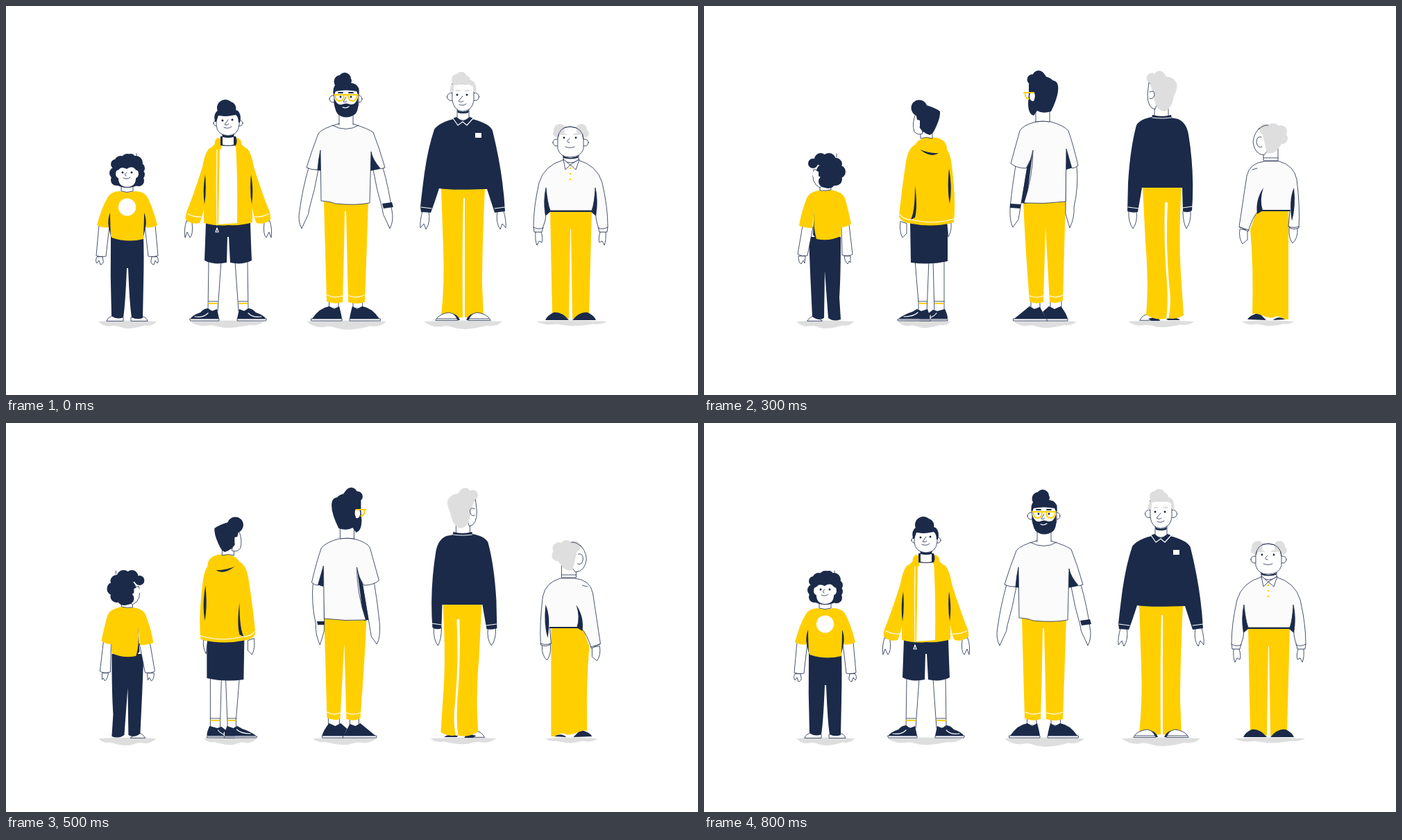
An HTML page that plays this animation: 997x561 px, repeating every 3.1 s.

```html
<!DOCTYPE html>
<html lang="en">
<head>
<meta charset="utf-8">
<title>Five ages turning around</title>
<style>
html, body { margin: 0; width: 100%; height: 100%; overflow: hidden; background: #fff; }
svg { display: block; width: 100%; height: 100%; }
path { fill: none; stroke-linejoin: round; stroke-linecap: round; }
.n { fill: #1b2a49; }
.y { fill: #ffcf01; }
.g { fill: #dedede; }
.w { fill: #fff; }
.o { fill: #fff; stroke: #1b2a49; stroke-width: .8; }
.p { fill: #fbfbfb; stroke: #1b2a49; stroke-width: .8; }
.l { stroke: #1b2a49; stroke-width: .8; }
.k { stroke: #1b2a49; stroke-width: 1.8; }
.s { stroke: #fff; stroke-width: 1.2; }
.t { stroke: #ffcf01; stroke-width: 1.9; }
</style>
</head>
<body>
<svg id="stage" viewBox="0 0 997 561"></svg>
<script>
// Each line: optional 2 (also draw its mirror image), style letter, path; "@x y r" is a circle.
// Marks sit on one side of the body only, so they are never mirrored.
const boy = {
  axis: 174.5,
  shade: { front: [133, 217, 11], turn: [133, 216, 11], side: [145, 206, 10] },
  base: `
2o M145 454Q147 447 157 447L169 449V454Z
n M151 332H198Q199 360 198 400L197 450Q188 453 181 449Q178 430 176 378H174Q172 430 169 449Q160 453 152 447Q150 390 151 332Z
2o M134 316L130 360Q137 363 144 361L149 317Z
2o M131 362Q128 367 131 371L134 367L136 373Q141 372 140 367L139 362Z
y M163 267Q175 270 186 267Q200 267 205 278Q213 295 218 316Q210 321 201 319Q198 328 198 336Q175 342 152 334Q150 322 148 319Q139 321 131 316Q138 290 146 277Q150 268 163 267Z
2n M199 298Q203 308 201 319L198 333Q199 310 199 298Z`,
  front: `
w @174.5 290 12.6`,
  head: `
o M166 256V267Q174 270 183 267V256Z
n @158 228 7@158 241 9@159 251 8@165 225 9@175 223 10@187 226 10@192 234 8@192 243 8@191 252 8@180 219 6
n M157 228H193V257Q174 267 157 257Z
w M161 239Q164 230 174 235Q183 229 188 238L187 250Q186 261 174.5 261Q163 261 162 250Z
2w M164 237Q158 235 158 243Q159 249 164 248Z
l M188 219V213`,
  face: `
n @168 240 1.5@181 240 1.5
l M174 240Q169 244 173 245
l M169 248Q174 251 179 247`,
  nape: `
o M166 256V267Q174 270 183 267V256Z
n @158 228 8@157 240 9@160 252 9@166 223 10@179 222 10@190 229 9@193 241 9@189 252 9@175 251 12@175 237 16`,
  side: `
o M162 455Q165 449 175 449L188 451V455Z
n M154 336L192 333Q189 380 189 420L190 453Q180 456 168 449Q166 420 161 385Q157 360 154 336Z
y M164 265Q152 272 149 293L150 337Q162 341 193 335L195 318Q194 282 188 270Q184 264 178 262Z
w M150 280Q161 279 162 291Q160 303 149 301Z
n M172 300Q170 312 173 319L195 319L192 336L170 339Q169 328 172 320Q170 310 172 300Z
o M172 320L166 358Q170 363 179 361L192 320Q182 323 172 320Z
o M167 361Q167 368 170 373L173 370L175 372L176 361Z
o M167 254L166 264Q174 266 184 262V248Z
n M167 258L177 256Q172 262 167 261Z
o M154 233L148 242L154 246Q155 258 165 259Q178 258 184 248L182 233Z
n @154 224 7.5@164 221 8@176 222 10@187 224 9@193 232 8@194 240 7.5@189 248 8
n M150 230Q160 236 168 233L172 242Q176 236 182 250L195 246V226L160 219Z
w M181 238Q173 235 173 243Q175 249 181 248Z
n @159 239 1.4
l M157 247Q160 249 163 246M190 219Q193 215 191 212`,
  turn: `
o M149 454Q153 447 160 447L170 454Z
n M151 333H197Q197 390 195 420L197 452Q187 456 179 450L174 382L173 450Q165 455 156 448Q153 390 151 333Z
o M142 317L135 358Q141 362 149 360L157 319Z
o M136 361Q136 370 140 372L143 367L145 371L146 361Z
o M198 319L199 359Q208 362 214 358L209 315Z
o M202 361Q203 369 207 372L209 368L211 370V361Z
n M159 294L157 330L166 339L170 320Z
y M166 266Q150 268 147 280Q140 298 137 317Q146 321 156 320Q157 308 159 294Q157 320 162 336Q180 340 197 332L198 319Q206 319 212 314Q207 290 203 277Q199 268 183 265Q174 268 166 266Z`,
  turnHead: `
o M167 255V266Q175 267 183 265V255Z
o M158 236Q153 255 167 262L176 255L170 238Z
n @157 227 7@168 221 9@180 222 10@190 228 9@194 239 10@190 250 9@179 252 11@174 253 9@172 238 10@180 237 14
w M165 239Q157 235 156 243Q159 251 165 248Z
l M191 218V213`
};

const teen = {
  axis: 320,
  shade: { front: [265, 372, 10], turn: [279, 355, 10], side: [287, 354, 10] },
  base: `
2o M292 368L291 440H305L310 368Z
2t M292 429H304
2l M292 426H305
2n M266 451Q268 446 280 442Q285 436 291 436L297 440L304 437L307 451Z
2o M265 451H307V454H266Z
2s M272 448Q284 450 291 443
n M288 312H352Q353 345 354 367Q340 374 323 370L321 333H319L318 370Q300 374 286 367Q287 340 288 312Z
2o M260 310Q256 322 258 334L261 326L265 334Q270 330 268 312Z
y M304 193Q300 203 292 206Q286 214 283 232Q273 264 263 290Q258 300 259 308Q268 316 279 313Q282 306 285 293V313Q305 318 320 316Q340 317 355 312V291Q357 306 361 313Q372 316 381 308Q382 300 377 290Q367 264 357 232Q354 214 348 206Q340 203 336 193Z
2s M262 300Q272 305 282 304
2n M287 243Q283 265 286 286Q289 268 287 243Z`,
  front: `
w M308 201L306 315L333 313Q334 250 331 200Z
s M304 207Q303 260 304 316
s M304 320L302 326H306Z`,
  head: `
y M305 190Q298 195 302 204L310 207L312 192ZM334 190Q342 195 338 204L330 203L328 192Z
n M309 188H331Q334 195 331 201Q320 203 309 201Z
w M312 184H328V200Q320 202 312 200Z
n M311 184Q320 190 329 184L328 189Q320 191 312 189Z
2o @303 169 4
o M303 157V172Q304 186 320 187Q335 186 336 171V157Z
n @316 147 12@321 148 10.5
n M301 167Q298 155 306 150Q320 145 334 151Q340 157 337 168H335Q335 160 331 157Q318 160 306 158L303 167Z`,
  face: `
n @312 165 1.5@326 164 1.5
l M320 164L315 171Q319 173 321 170
l M314 175Q320 178 325 174`,
  nape: `
o M312 182H328V193H312Z
y M304 196Q318 185 336 196Q350 212 320 216Q292 212 304 196Z
n M305 207Q320 215 336 207Q320 221 305 207Z
2o @303 169 4
n @316 147 11.5@321 148 10.5
n M302 160Q303 149 320 149Q338 149 338 160Q336 180 320 186Q304 180 302 160Z`,
  side: `
o M306 368L312 430V443H327L326 368Z
t M313 429H326
l M312 426H326
n M288 451Q290 447 300 442L309 434Q314 438 318 440L327 438Q331 445 331 451Z
o M287 452H331V455H288Z
s M292 448Q305 449 312 442
n M296 305H337Q338 340 336 369Q315 373 298 369Q297 340 296 305Z
o M320 311Q319 320 322 328L326 334Q330 326 329 313Z
o M307 197Q293 207 293 235Q291 280 293 308H304L311 199Z
y M314 196Q301 205 300 240Q299 280 300 308L328 310L329 315Q337 316 344 311Q343 270 340 240Q339 220 333 214Q343 205 341 193Q336 186 326 187Q318 190 314 196Z
n M321 188Q328 184 336 187Q330 194 321 193Z
s M301 305L329 308L344 306
n M316 233Q314 262 317 288Q320 262 316 233ZM338 262Q334 275 337 290Q341 275 338 262Z
o M307 182L308 196Q315 198 323 190L322 176Z
n M306 184L316 181Q312 188 307 187Z
o M294 155L286 167L293 172Q294 183 304 185Q314 184 320 176L318 152Z
n @304 145 10.5@310 146 8
n M296 152Q305 158 309 156L313 166Q318 158 319 168L316 177L322 180Q331 172 333 157Q328 147 316 146Z
w M319 162Q312 158 312 165Q313 172 318 171Z
n @298 162 1.5
l M294 173Q298 175 301 172`,
  turn: `
o M304 366L309 428V442H321L324 366ZM330 366L332 442H346V366Z
t M310 429H320M333 429H345
l M309 426H321M332 426H346
n M311 451Q322 445 330 438L336 440L347 437Q351 445 351 451Z
o M311 452H351V454H311Z
n M280 451Q290 444 300 441L307 437L313 440L322 437Q325 445 326 451Z
o M279 452H326V454H280Z
s M288 448Q302 448 308 442M327 449Q332 447 335 443M326 451V446
n M297 311H351V368Q325 374 298 370Z
o M283 311Q281 325 286 334L292 328V314ZM350 314L352 333Q357 325 356 313Z
y M304 200Q294 205 291 225Q284 270 281 304Q285 313 300 314Q330 320 360 312Q363 280 358 240Q356 214 350 207Q350 193 335 190Q318 187 308 195Z
n M304 259Q308 290 304 305L297 309Q304 300 304 259ZM353 234Q350 265 354 285Q358 262 353 234Z
s M282 301Q290 309 299 308Q330 316 360 307`,
  turnHead: `
n M311 207Q325 213 338 212Q328 220 311 207Z
o M312 182V191Q320 188 329 191V180Z
o M305 155Q299 170 303 181Q308 187 315 184L311 162Z
n @310 147 11.5
n M305 155L320 143Q334 147 340 152Q341 160 334 175Q330 185 325 186Q313 182 309 172Z
w M311 165Q305 162 305 170Q307 177 311 174Z`
};

const man = {
  axis: 489.5,
  shade: { front: [433, 548, 13], turn: [446, 537, 10], side: [451, 529, 10] },
  marks: {
    front: 'n M542 285L556 283L558 290L544 292Z',
    quarter: 'n M521 285H534V291H521Z',
    side: 'n M480 284L492 286V291L479 289Z',
    turn: 'n M441 285L456 286V292L441 291Z',
    back: 'n M437 285L423 283L421 290L435 292Z',
    turnFlip: 'n M448 286H459V291H449Z',
    quarterFlip: 'n M523 286L538 285V291L523 292Z'
  },
  base: `
2o M466 424L465 436H479V424Z
2n M441 451Q452 435 466 433L473 437L480 433Q483 444 484 451Z
2o M440 451H484V454H440Z
y M458 282H522L517 427Q505 431 493 427L490 296H488Q487 360 485 427Q474 431 462 426Z
2s M463 417Q474 422 485 418
2o M436 233Q427 265 423 295Q420 310 426 321L431 310Q437 300 437 292Q445 265 450 236Z
2n M453 208L440 235L455 238Z
p M479 170Q456 176 450 184Q441 207 433 233Q441 237 449 236Q450 222 453 208L454 281Q468 282 474 285Q505 288 524 284L526 210Q528 222 540 235L546 233Q538 205 529 182Q522 177 500 170Q490 172 479 170Z`,
  front: `
l M470 172Q490 183 508 172`,
  head: `
w M480 154H500V171Q490 178 480 171Z
l M480 156V171M500 156V171
2o @471 134 5
o M473 118H508V142Q505 155 490 156Q476 155 473 142Z
n @482 109 9.5@488 105 9@492 108 6
n M472 130Q469 114 480 110L497 111Q511 112 508 130L505 123Q490 120 475 123Z
n M473 133Q477 144 484 142Q490 139 496 142Q504 143 507 132Q509 150 503 156Q490 165 478 156Q472 148 473 133Z`,
  face: `
k M479 125H485M494 125H500
n @482 131 1.5@497 131 1.5
l M490 131L486 138Q489 140 491 137
s M485 146Q490 148 494 145
t M473 128H507M475 128Q474 137 481 137Q487 137 487 128M493 128Q493 137 499 137Q506 137 506 128`,
  nape: `
o M480 150H500V171Q490 168 480 171Z
2o @471 134 5
n @483 108 10.5@488 105 9@496 111 9
n M471 130Q468 113 482 110L500 109Q511 114 508 130Q508 150 500 156H479Q471 150 471 130Z`,
  side: `
o M486 424V438H500L499 424Z
n M456 451Q470 440 483 433L492 438L502 433Q508 442 509 451Z
o M454 451H510V454H454Z
y M464 283L506 281Q500 320 501 360Q503 390 504 425Q494 429 484 426Q480 390 472 340Q465 305 464 283Z
s M483 420Q494 423 504 418
p M471 173Q456 185 456 215Q457 255 458 283Q475 288 511 283V232L514 230Q513 200 508 183Q505 172 498 163Q485 166 471 173Z
n M481 202Q477 222 486 237Q487 215 481 202ZM505 244L490 286L500 284Z
o M485 235Q484 265 479 285Q476 300 478 312L483 321Q490 310 491 298Q504 260 511 232Z
l M482 302L480 314M487 301L485 317
l M485 235Q500 236 514 231
o M479 152V170Q487 167 498 163L492 148Z
o M461 118V126L451 135L460 139L462 147H490V118Z
n M458 140Q464 136 468 139L470 143L480 143Q487 140 488 130L494 136Q490 158 476 159Q460 160 458 150Z
n @467 106 8.5@477 102 9@487 106 9
n M462 111Q480 119 483 113L489 125L487 136L494 147Q506 135 506 118Q505 108 490 103Z
w M495 127Q488 122 488 131Q489 138 495 136Z
k M463 120L468 122
n @463 128 1.5
s M460 145H466
t M458 123L490 126M459 123V131Q465 134 466 125`,
  turn: `
o M471 424V438H484V424ZM499 424V438H515V424Z
n M447 451Q458 442 469 433L476 437L484 434L493 451ZM488 441L497 433L505 437L514 433Q522 443 524 451H493Z
o M446 451H524V454H446Z
l M494 451V454
y M460 283L521 282Q519 350 517 425Q507 430 498 427L492 318L489 427Q478 431 469 426Q463 350 460 283Z
s M469 418Q480 422 489 418M498 418Q507 422 517 417
o M449 230Q444 260 441 290Q440 310 445 319L453 308L456 290L466 233Z
o M521 230V300L527 320Q534 305 533 290Q540 260 537 230Z
n M474 208L465 234L457 284L464 285ZM522 206L538 231L522 236Z
p M478 167Q459 172 455 180L442 227Q450 234 464 234Q472 222 474 208Q474 245 461 284Q490 286 521 282L522 206L530 234Q535 234 539 230Q532 200 525 180Q518 172 500 167Q489 165 478 167Z`,
  turnHead: `
o M478 148V167Q488 165 498 167V148Z
n @473 106 7.5@482 102 9
n M468 112L484 94Q490 96 493 102Q500 104 502 107Q509 108 510 115Q512 128 500 152Q488 156 480 151L475 158Q467 156 467 140L468 125Z
w M476 125Q469 123 469 131Q470 138 475 137Q478 131 476 125Z
t M461 125H475M463 125Q462 133 468 134`
};

const elder = {
  axis: 658.5,
  shade: { front: [602, 715, 12], turn: [611, 706, 9], side: [625, 693, 6] },
  marks: {
    front: 'w M676 183H685V190H676Z',
    quarter: 'w M669 183H677V190H669Z',
    side: 'w M637 181H645V188H637Z',
    quarterFlip: 'w M680 183H688V190H680Z'
  },
  base: `
y M627 262H690Q686 350 686 400L688 448Q674 451 661 449L661 277H659Q657 350 658 449Q642 451 627 448Q632 400 630 350Z
2n M640 443Q650 443 654 453H645Z
2o M619 453Q622 446 633 443Q645 439 651 453Z
2l M621 451H651
2o M600 296Q596 310 597 320L602 314L605 322Q612 312 609 296Z
n M645 163Q624 168 617 178Q608 205 603 240Q599 270 597 290L598 297L612 298Q617 285 624 263Q640 266 693 264L704 298L719 296Q716 240 701 180Q698 170 672 163Q658 168 645 163Z
2s M598 290L613 292`,
  front: '',
  head: `
o M650 148V162Q658 168 667 162V148Z
n M650 150Q658 155 667 150L666 154Q658 156 651 154Z
n M649 160L658 167L668 160L673 162L664 172L658 167L651 172L644 162Z
s M644 162L651 172L658 167L664 172L673 162
2o @641 131 5.5
o M643 112H674V136Q672 151 658 152Q645 151 643 136Z
g @650 106 8@656 103 8@662 107 7
g M640 126Q638 112 650 108L670 107Q679 110 677 126L673 123V116Q660 109 645 115V123Z
g M647 122Q651 119 655 122V123H647ZM661 122Q665 119 669 122V123H661Z`,
  face: `
n @650 128 1.5@664 128 1.5
l M658 130L652 137Q656 140 659 137
l M653 142Q658 145 663 141`,
  nape: `
o M650 146V162Q658 160 667 162V146Z
s M645 163Q658 167 672 163
2o @641 131 5.5
g @650 105 9@658 103 8@668 108 8
g M640 125Q638 108 658 104Q679 108 677 125Q675 148 664 152H653Q642 146 640 125Z`,
  side: `
y M632 262H680Q675 330 681 400L684 447Q680 452 677 450Q665 438 653 442Q648 390 640 340Q633 290 632 262Z
o M637 453Q645 443 660 441Q674 440 680 453Z
l M639 451H680
n M672 444Q680 446 682 453H677Z
n M649 161Q631 172 629 190Q628 230 629 262Q640 266 660 264L658 297Q665 300 676 297Q683 265 683 225Q682 185 675 164Q670 158 663 153Z
s M659 290Q666 294 677 292
o M661 298L663 307L666 318Q674 312 674 298Z
l M668 308V316M671 307V313
o M648 146V160L665 153L663 143Z
n M647 148L657 147Q653 153 648 152Z
n M648 160L663 153L667 156L650 165Z
s M649 165Q658 164 667 156
o M635 112L633 124L626 134L634 139Q636 149 647 150Q658 148 662 138L660 110Z
g @641 103 7.5@651 101 7.5
g M634 105Q645 113 656 112L658 123Q667 120 665 130L663 140Q672 132 674 116Q670 107 655 103Z
o M660 123Q668 120 668 128Q666 136 660 134
n @638 125 1.4
l M635 139Q639 141 641 137`,
  turn: `
o M628 453Q633 444 640 445L652 453Z
n M640 451Q655 447 657 454H645ZM666 451Q680 447 686 453H668Z
y M632 261H688Q683 340 688 400L691 446Q680 453 668 450Q652 455 637 445Q641 400 636 340Z
w M664 284Q666 281 668 284Q665 340 670 400Q674 432 669 451L666 450Q669 430 667 400Q662 340 664 284Z
o M612 296Q611 312 618 321Q625 312 623 296ZM690 296Q690 312 695 321Q702 312 701 296Z
n M646 160Q628 163 623 172Q614 205 611 255L610 296Q618 299 625 297L631 262H689L690 296Q697 299 703 295Q707 240 698 185Q695 168 683 163Q660 158 646 160Z
s M611 290L626 292M690 291L704 289`,
  turnHead: `
o M649 144V160H669V144Z
n M646 157Q660 161 673 157L674 162H645Z
s M646 161Q660 163 673 161
o M641 110L639 128Q639 147 650 149L656 130Z
g @645 104 7.5@656 101 7.5
g M642 110L656 94Q664 96 666 102Q676 102 681 111Q683 118 677 130Q674 148 664 152Q652 150 650 140L646 122Z
o M642 124Q649 120 649 128Q647 136 642 133`
};

const grandpa = {
  axis: 813.5,
  shade: { front: [764, 866, 7], turn: [775, 850, 7], side: [788, 843, 6] },
  base: `
y M784 295H844L840 446Q828 449 816 451L814 322H813L811 451Q800 449 787 446Z
2n M777 453Q780 446 789 442Q800 440 811 453Z
2o M763 326Q762 338 765 345L768 339L772 341Q774 335 771 326Z
2n M778 262Q770 285 777 303L785 296Z
p M803 222Q775 230 768 255Q760 290 760 318L761 326L772 326L774 318Q779 305 777 300Q774 280 778 262Q780 284 784 295H844Q848 284 849 262Q853 280 850 300Q849 305 853 318L855 326L866 326L867 318Q867 290 859 255Q852 230 824 222Z
2l M760 319Q767 323 774 320
k M784 296H844`,
  front: `
y @813 234 1.3@813 242 1.3@813 250 1.3`,
  head: `
o M803 212V222Q813 230 825 222V212Z
o M803 221L806 236L813 229L821 236L826 221L813 229Z
n M802 216Q813 222 825 216L824 219Q813 222 803 219Z
g @798 179 9@793 184 5@829 178 8@834 184 6
2o @793 197 5
o M795 190Q797 174 813 174Q831 175 832 192V206Q828 218 813 218Q798 218 795 206Z
g @799 180 6@828 180 6
l M795 190Q797 174 813 174Q831 175 832 192`,
  face: `
g M800 185Q804 182 808 185V186H800ZM817 185Q821 182 825 184V186H817Z
n @804 190 1.4@821 190 1.4
l M812 191Q805 197 812 197
l M806 203Q813 206 819 203`,
  nape: `
o M803 210V223H824V210Z
2o @793 197 5
o M795 190Q797 173 813 173Q831 174 832 192V206Q813 220 795 206Z
g @798 180 9@829 180 9@799 192 8@828 192 8@813 189 13
g M795 194H832Q826 213 813 212Q800 213 795 194Z`,
  side: `
n M788 453Q790 446 803 441Q820 444 836 453Z
y M790 294H832Q834 360 836 452Q825 452 818 445Q808 440 801 442Q797 380 792 330Z
p M804 220Q786 230 784 262Q783 285 790 294H816L814 320Q822 326 829 320Q841 285 841 255Q840 225 827 215Z
k M789 295H815
n M814 262Q819 280 815 295L808 294Q815 285 814 262Z
l M814 262Q811 290 813 316Q822 324 830 317
o M814 322Q813 335 817 343Q825 335 826 322Z
l M819 331V339M822 330V336
o M806 212V221L826 215V203Z
o M803 221L804 231L811 225L829 217L826 214Z
n M805 215L818 213Q812 219 807 218Z
y @793 241 1.3
o M790 186Q794 172 808 171Q820 171 828 180L826 203Q820 216 806 216Q794 213 792 204L790 199L781 197Z
g @826 177 9@833 184 8@830 193 8@821 180 5
g M822 190H834L828 207Z
o M825 191Q816 187 817 196Q819 204 825 201
n @796 189 1.4
l M792 203Q796 205 798 201`,
  turn: `
n M783 452Q787 445 800 443L810 453ZM820 453Q828 446 838 452Z
y M797 294H842V452H837Q828 446 822 448Q820 452 806 447Q795 442 790 444Q792 380 787 322Z
o M772 322Q770 335 776 343L783 337V324ZM843 320Q842 335 848 342Q856 335 855 321Z
p M808 224Q786 226 782 245Q776 285 771 318L784 325Q790 305 799 295H844L842 318Q848 324 857 320Q859 290 854 250Q850 230 829 224Z
l M771 319L785 323M842 318Q850 321 857 318
n M806 262Q794 280 797 300L805 295Q800 280 806 262ZM850 262Q842 280 847 310Q853 290 850 262Z
k M799 295H844
l M790 236L797 234`,
  turnHead: `
o M806 208V223H827V206Z
l M806 219H827
o M803 173Q792 183 791 196Q793 214 807 215L826 190V174Z
g @808 178 8@820 179 10@831 181 9@833 191 8@821 196 11
g M804 182L811 212Q822 215 828 204L826 180Z
o M803 189Q796 187 796 197Q798 206 804 203
l M799 178Q806 171 813 172`
};

const people = [boy, teen, man, elder, grandpa];

const flip = axis => `matrix(-1 0 0 1 ${2 * axis} 0)`;
const group = (transform, body) => `<g transform="${transform}">${body}</g>`;
const circle = (_, x, y, r) => `M${x - r} ${y}a${r} ${r} 0 1 0 ${2 * r} 0a${r} ${r} 0 1 0 ${-2 * r} 0Z`;

function draw(shapes, axis) {
  if (!shapes) return '';
  return shapes.trim().split('\n').map(line => {
    const [, pair, style, data] = line.match(/^(2?)(\w) (.+)/);
    const d = data.replace(/@([\d.]+) ([\d.]+) ([\d.]+)/g, circle);
    const path = `<path class="${style}" d="${d}"/>`;
    return pair ? path + group(flip(axis), path) : path;
  }).join('');
}

function shadow([left, right, h]) {
  const w = right - left;
  const curve = (type, ...n) => type + n.map((v, i) => v * (i % 2 ? h : w)).join(' ');
  return `<path class="g" d="M${left} 455Q${left + w / 2} 452 ${right} 455` +
    curve('q', -.08, .7, -.2, .5) + curve('s', -.2, .5, -.32, .4) +
    curve('s', -.16, -.5, -.25, -.3) + curve('q', -.12, .2, -.23, -.6) + 'Z"/>';
}

const views = {
  front: (p, part) => shadow(p.shade.front) + part('base') + part('front') + part('head') + part('face'),
  quarter: (p, part) => shadow(p.shade.turn) + part('turn') +
    group(`translate(${p.axis * .18 - 6} 0) scale(.82 1)`, part('front')) +
    group('translate(-2 0)', part('head') + group('translate(-5 0)', part('face'))),
  side: (p, part) => part('side'),
  turn: (p, part) => shadow(p.shade.turn) + part('turn') + part('turnHead'),
  back: (p, part) => shadow(p.shade.front) + part('base') + part('nape')
};

function scene(view, mirrored) {
  return '<g>' + people.map(p => {
    const figure = views[view](p, name => draw(p[name], p.axis));
    const ground = view === 'side' ? shadow(p.shade.side) : '';
    const marks = draw(p.marks?.[mirrored ? view + 'Flip' : view]);
    return ground + (mirrored ? group(flip(p.axis + .2), figure) : figure) + marks;
  }).join('') + '</g>';
}

const stage = document.getElementById('stage');
stage.innerHTML = scene('front') + scene('quarter') + scene('side') + scene('turn') +
  scene('back') + scene('turn', true) + scene('side', true) + scene('quarter', true);
const scenes = [...stage.children];

const LOOP = 3100, STEP = 100;
const start = performance.now();

function render(time) {
  const step = Math.floor(time % LOOP / STEP);
  const pose = step < scenes.length ? step : 0;
  scenes.forEach((s, i) => { s.style.display = i === pose ? '' : 'none'; });
}

function tick() {
  render(performance.now() - start);
  requestAnimationFrame(tick);
}
tick();
</script>
</body>
</html>
```
